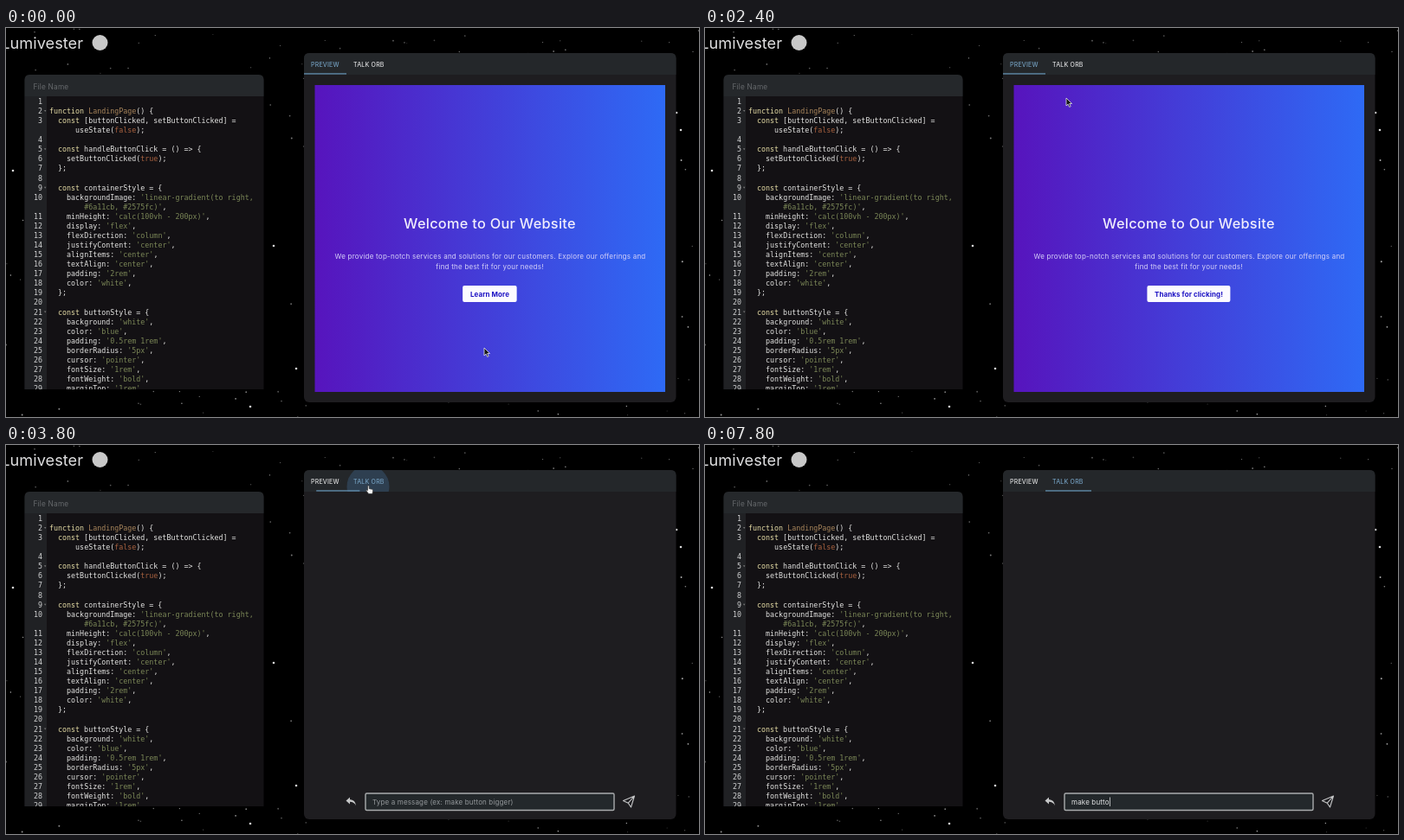
An HTML page for the animation above (8 s loop, 800 px wide and 450 px high).

```html
<!DOCTYPE html>
<html lang="en">
<head>
<meta charset="utf-8">
<title>Code editor with live preview</title>
<style>
  html, body { margin: 0; width: 100%; height: 100%; overflow: hidden; background: #000; }
  svg { display: block; width: 100%; height: 100%; filter: blur(.4px); }
  text { font-family: Inter, sans-serif; white-space: pre; }
  #code text { font: 8.34px "DejaVu Sans Mono", monospace; fill: #e4e4e2; }
  #code .number { text-anchor: end; fill: #d2d3d4; }
  #code .storage { fill: #e6dda6; }
  #code .name { fill: #a8855b; }
  #code .constant { fill: #a8613f; }
  #code .string { fill: #7b8757; }
  .tab { font-size: 7px; font-weight: 500; letter-spacing: .2px; }
  .copy { font-size: 8px; letter-spacing: .23px; fill: #d6d1f8; }
  .middle { text-anchor: middle; }
  .field { font-size: 8px; letter-spacing: .15px; }
  #label { font-size: 8px; font-weight: 700; letter-spacing: .08px; fill: #1d12c4; }
</style>
</head>
<body>
<svg viewBox="0 0 800 450">
  <defs>
    <linearGradient id="sky">
      <stop offset="0" stop-color="#5714bd"/>
      <stop offset="1" stop-color="#2e6af5"/>
    </linearGradient>
    <clipPath id="editorClip"><path d="M21.5 418V60q0-6 6-6h264q6 0 6 6v358z"/></clipPath>
    <clipPath id="tabClip"><rect x="393" y="29" width="53" height="25"/></clipPath>
  </defs>
  <rect width="800" height="450"/>
  <g id="stars" fill="#fff"></g>

  <text x="89" y="23.500" text-anchor="end" font-size="18.2" fill="#dededf">Lumivester</text>
  <circle cx="108.500" cy="17" r="9" fill="#c8c8c8"/>

  <g clip-path="url(#editorClip)">
    <rect x="21" y="54" width="277" height="365" fill="#131114"/>
    <rect x="21" y="79" width="26" height="340" fill="#202124"/>
    <rect x="21" y="54" width="277" height="25" fill="#25282b"/>
    <text x="31.500" y="71" font-size="8.3" letter-spacing=".2" fill="#66696c">File Name</text>
    <g id="code"></g>
  </g>

  <rect x="344" y="29" width="429.500" height="404" rx="6" fill="#1e1d20"/>
  <path d="M344 54V35q0-6 6-6h417.500q6 0 6 6v19z" fill="#24272a"/>
  <circle id="ripple" cx="418" cy="48" r="24.500" fill="#2e3f50" clip-path="url(#tabClip)"/>
  <text id="previewTab" class="tab" x="352" y="44.500">PREVIEW</text>
  <text id="chatTab" class="tab" x="401" y="44.500">TALK ORB</text>
  <rect id="underline" y="52.300" height="1.300" fill="#628fae"/>

  <g id="preview">
    <rect x="356.500" y="66" width="404.500" height="355" fill="url(#sky)"/>
    <text class="middle" x="558.500" y="232" font-size="16.3" font-weight="500" letter-spacing=".3" fill="#f1eefc">Welcome to Our Website</text>
    <text class="copy middle" x="559" y="266.800">We provide top-notch services and solutions for our customers. Explore our offerings and</text>
    <text class="copy middle" x="558.500" y="279">find the best fit for your needs!</text>
    <rect id="button" y="298" height="19" rx="2" fill="#fbfaff"/>
    <text id="label" class="middle" x="558.500" y="310.800"></text>
  </g>

  <g id="chat">
    <path d="M397 407.500l-4.500 4 4.500 4v-2.700q5 0 7 4.500-.7-6.800-7-7.300z" fill="#c6c7c8"/>
    <rect x="415" y="403" width="287" height="19.500" rx="1.500" fill="#23282b" stroke="#a9acad" stroke-width="1.400"/>
    <text id="message" class="field" x="423" y="415.700"></text>
    <rect id="caret" y="407.500" width=".8" height="10.500" fill="#d8dadb"/>
    <path d="M712.500 411.500l13-5.500-4 13-3.200-4.800zM718.300 414.200l7.200-8.200" fill="none" stroke="#c6c7c8" stroke-width="1.100" stroke-linejoin="round"/>
  </g>

  <g id="arrow"><path d="M0 0v9l2.100-1.900 1.500 3.300 1.600-.7-1.500-3.200h2.900z" fill="#151515" stroke="#e6e6ee" stroke-width=".8"/></g>
  <g id="hand"><path d="M-1.500-4.500q1-1 1.700 0v3l3.700.8q1 .4.800 1.700l-.8 3.500h-4.200l-3-3.800q-.2-1.300 1.800-.2z" fill="#f4f4f4" stroke="#333" stroke-width=".7"/></g>
  <g id="beam"><path d="M-2-5q2 0 2 1.500q0-1.500 2-1.500M0-3.500v7M-2 5q2 0 2-1.500q0 1.500 2 1.500M-1.200 1.500h2.400" fill="none" stroke="#c9cbcc" stroke-width="1"/></g>
</svg>
<script>
const LOOP = 8000, STEP = 200;
const el = id => document.getElementById(id);
const show = (id, visible) => el(id).setAttribute('visibility', visible ? 'visible' : 'hidden');
const set = (id, attrs) => Object.entries(attrs).forEach(([k, v]) => el(id).setAttribute(k, v));

function drawStars() {
  let seed = 29;
  const random = () => (seed = seed * 16807 % 2147483647) / 2147483647;
  const star = (x, y, r, a) => `<circle cx="${x}" cy="${y}" r="${r}" opacity="${a}"/>`;
  let out = '';
  for (let i = 0; i < 300; i++) {
    out += star(random() * 800, random() * 450, .5 + random() * .5, .2 + random() * .5);
  }
  const bright = [[8, 165], [774, 98], [779, 118], [309, 252], [335, 394], [282, 438]];
  el('stars').innerHTML = out + bright.map(([x, y]) => star(x, y, 1.3, .85)).join('');
}

// A leading "~" marks a wrapped row, which has no line number.
const source = `
function LandingPage() {
  const [buttonClicked, setButtonClicked] =
~      useState(false);

  const handleButtonClick = () => {
    setButtonClicked(true);
  };

  const containerStyle = {
    backgroundImage: 'linear-gradient(to right,
~        #6a11cb, #2575fc)',
    minHeight: 'calc(100vh - 200px)',
    display: 'flex',
    flexDirection: 'column',
    justifyContent: 'center',
    alignItems: 'center',
    textAlign: 'center',
    padding: '2rem',
    color: 'white',
  };

  const buttonStyle = {
    background: 'white',
    color: 'blue',
    padding: '0.5rem 1rem',
    borderRadius: '5px',
    cursor: 'pointer',
    fontSize: '1rem',
    fontWeight: 'bold',
    marginTop: '1rem',`;

function highlight(line) {
  const tokens = /(?<string>^#.*'|'[^']*'?)|(?<storage>\b(?:function|const)\b)|(?<name>LandingPage)|(?<constant>\b(?:true|false)\b)/g;
  return line.replace(tokens, (match, ...rest) => {
    const kind = Object.entries(rest.at(-1)).find(([, value]) => value)[0];
    return `<tspan class="${kind}">${match}</tspan>`;
  });
}

function drawCode() {
  let number = 0;
  el('code').innerHTML = source.split('\n').map((row, i) => {
    const y = 88 + i * 11.07;
    const wrapped = row[0] === '~';
    const line = wrapped ? row.slice(1) : row;
    const text = line.trimStart();
    const x = 50 + (line.length - text.length) * 5.02;
    const gutter = wrapped ? '' : `<text class="number" x="42" y="${y}">${++number}</text>`;
    const fold = text.endsWith('{') ? `<path d="M44 ${y - 4}h2.400l-1.200 2z" fill="#777"/>` : '';
    return `${gutter}${fold}<text x="${x}" y="${y}">${highlight(text)}</text>`;
  }).join('');
}

// time, x, y of the pointer
const path = [
  [0, 552, 370], [200, 552, 370], [800, 562, 308], [1600, 562, 308], [2200, 417, 81],
  [2600, 417, 81], [3000, 419, 52], [4000, 419, 52], [4800, 526, 418], [LOOP, 526, 418]
];
const smooth = u => u * u * (3 - 2 * u);

function pointerAt(t) {
  const i = path.findIndex(([time]) => time > t);
  const [t0, x0, y0] = path[i - 1], [t1, x1, y1] = path[i];
  const u = smooth((t - t0) / (t1 - t0));
  return [x0 + (x1 - x0) * u, y0 + (y1 - y0) * u];
}

function drawPointer(t) {
  const [x, y] = pointerAt(t);
  const overButton = x > 527 && x < 590 && y > 298 && y < 317 && t < 3800;
  const overTab = x > 393 && x < 446 && y < 54;
  const overField = t >= 3800 && y > 403;
  const active = t >= 6000 ? '' : overButton || overTab ? 'hand' : overField ? 'beam' : 'arrow';
  for (const id of ['arrow', 'hand', 'beam']) show(id, id === active);
  if (active) set(active, { transform: `translate(${x} ${y})` });
}

function draw(t) {
  const chatting = t >= 3800;
  show('preview', !chatting);
  show('chat', chatting);

  const slide = t < 3800 ? 0 : t < 4000 ? .29 : 1;
  set('underline', { x: 344 + 49 * slide, width: 49 + 4 * slide });
  set('previewTab', { fill: chatting ? '#dcddde' : '#729dbd' });
  set('chatTab', { fill: chatting ? '#729dbd' : '#dcddde' });
  set('ripple', { opacity: t === 3800 ? 1 : t === 4000 ? .4 : 0 });

  const clicked = t >= 1400;
  const width = clicked ? 96 : 62.5;
  set('button', { x: 558.4 - width / 2, width });
  el('label').textContent = clicked ? 'Thanks for clicking!' : 'Learn More';

  const typed = 'make butto'.slice(0, Math.max(0, (t - 5800) / STEP));
  const message = el('message');
  message.textContent = typed || 'Type a message (ex: make button bigger)';
  message.setAttribute('fill', typed ? '#e4e5e6' : '#94989b');
  set('caret', { x: 423 + (typed ? message.getComputedTextLength() + .3 : 0) });
  show('caret', t >= 5000 && (typed || t % 1000 < 600));
  drawPointer(t);
}

function frame(now) {
  draw(Math.floor(now % LOOP / STEP) * STEP);
  requestAnimationFrame(frame);
}

drawStars();
drawCode();
requestAnimationFrame(frame);
</script>
</body>
</html>
```
